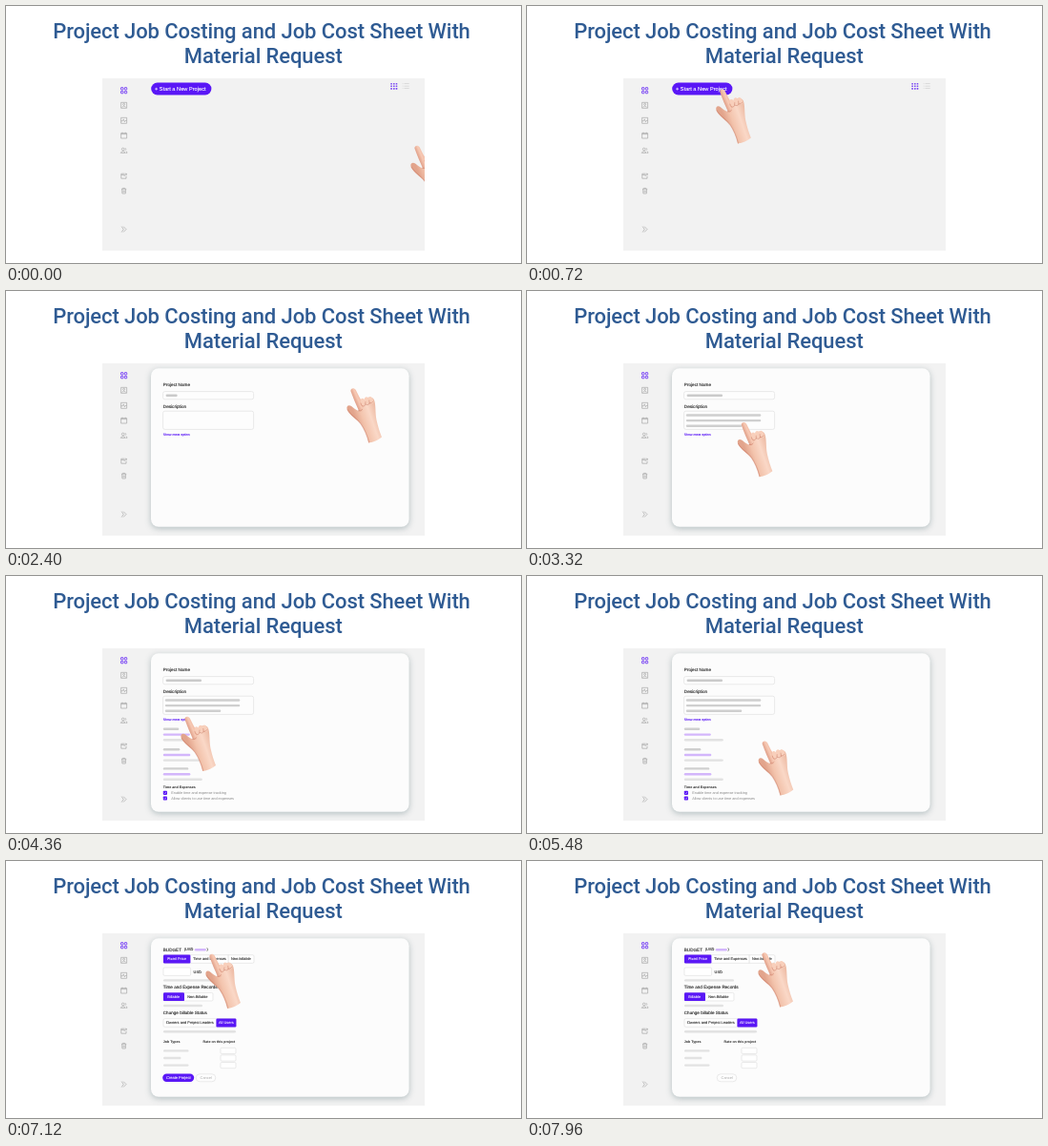
These frames come from a looping animation (540x270 px, 8000 ms). An HTML page with a canvas:

```html
<!DOCTYPE html>
<html lang="en">
<head>
<meta charset="utf-8">
<title>Project Job Costing</title>
<style>
  html, body { margin: 0; width: 100%; height: 100%; overflow: hidden; background: #fff; }
  canvas { display: block; width: 540px; height: 270px; }
</style>
</head>
<body>
<canvas id="stage"></canvas>
<script>
const W = 540, H = 270, LOOP = 8000;
const PURPLE = '#5a17f6', LILAC = '#d3b6fb', INK = '#222';
const GREY = '#cfcfcf', PALE = '#e2e2e2', EDGE = '#dcdcdc', STAGE = '#f2f2f2';
const SANS = '"Liberation Sans", Arial, sans-serif';
const canvas = document.getElementById('stage');
const ctx = canvas.getContext('2d');
const ratio = window.devicePixelRatio || 1;
canvas.width = W * ratio;
canvas.height = H * ratio;

const clamp = v => Math.max(0, Math.min(1, v));
const span = (t, from, to) => clamp((t - from) / (to - from));
const easeOut = (u, power) => 1 - (1 - u) ** power;
const easeInOut = u => (1 - Math.cos(Math.PI * u)) / 2;

// Fingertip moves: start, duration, x, y, ease power
const START = [431, 147];
const MOVES = [
  [240, 800, 202.5, 87, 5],
  [1080, 1040, 364, 102.5, 3],
  [3000, 800, 190, 148, 3],
  [4400, 600, 248, 168, 3],
  [5440, 240, 252, 186, 2],
  [5680, 560, 252, 158, 2],
  [6240, 580, 189, 99.5, 4],
  [7040, 440, 248, 96, 3],
  [7880, 100, 249, 96.5, 2]
];

function fingertip(t) {
  let [x, y] = START;
  for (const [start, length, toX, toY, power] of MOVES) {
    if (t < start) break;
    const p = easeOut(span(t, start, start + length), power);
    x += (toX - x) * p;
    y += (toY - y) * p;
  }
  return [x, y];
}

function box(x, y, w, h, r, fill, stroke, line = 0.6) {
  ctx.beginPath();
  ctx.roundRect(x, y, w, h, r);
  if (fill) { ctx.fillStyle = fill; ctx.fill(); }
  if (stroke) { ctx.strokeStyle = stroke; ctx.lineWidth = line; ctx.stroke(); }
}

function bar(x, y, w, color = GREY, h = 2.4) {
  if (w > 0) box(x, y - h / 2, w, h, Math.min(w, h) / 2, color);
}

// Set large and scaled down, so tiny type keeps its true spacing
function label(str, x, y, size, color = INK, weight = 400, edge = 0.12) {
  const zoom = 10;
  ctx.save();
  ctx.translate(x, y + size * 0.36);
  ctx.scale(1 / zoom, 1 / zoom);
  ctx.font = `${weight} ${size * zoom}px ${SANS}`;
  ctx.textRendering = 'geometricPrecision';
  ctx.textAlign = 'left';
  ctx.textBaseline = 'alphabetic';
  ctx.fillStyle = ctx.strokeStyle = color;
  ctx.fillText(str, 0, 0);
  if (edge) {
    ctx.lineWidth = edge * zoom;
    ctx.strokeText(str, 0, 0);
  }
  ctx.restore();
}

function clipTo(x, y, w, h, draw) {
  ctx.save();
  ctx.beginPath();
  ctx.rect(x, y, w, h);
  ctx.clip();
  draw();
  ctx.restore();
}

function title() {
  ctx.font = '500 22px Roboto, "Open Sans", sans-serif';
  ctx.letterSpacing = '-0.1px';
  ctx.textAlign = 'center';
  ctx.textBaseline = 'alphabetic';
  ctx.fillStyle = '#2f5b93';
  ctx.fillText('Project Job Costing and Job Cost Sheet With', 268, 33.6);
  ctx.fillText('Material Request', 269.7, 59.6);
  ctx.letterSpacing = '0px';
}

function icon(path, y) {
  ctx.save();
  ctx.translate(123.6, y);
  ctx.strokeStyle = '#a3a3a3';
  ctx.lineWidth = 0.65;
  ctx.stroke(new Path2D(path));
  ctx.restore();
}

const FRAME = 'M-3-3H3V3H-3Z';
const ICONS = [
  [104.3, FRAME + 'M-1-1A1 1 0 1 0 1-1A1 1 0 1 0-1-1M-2 2Q0-.6 2 2'],
  [120.3, FRAME + 'M-3 .5H-1.4L-.4-1.4L.8 1.4L1.6 0H3'],
  [136, 'M-3-2.4H3V3H-3ZM-3-1.4H3M-1.6-3.4V-2M1.6-3.4V-2'],
  [151.8, 'M-2.2-1.4A1.3 1.3 0 1 0 .4-1.4A1.3 1.3 0 1 0-2.2-1.4M-3.4 2.5Q-.9-1 1.6 2.5ZM1.2-2.7Q3.2-1.4 1.2-.2M2 .4Q3.2 1 3.4 2.5H2.2'],
  [178.6, 'M1-2.4H-2.8V2.6H2.4V0M-2.8-1.2H1M0 .4L2.8-2.4M1.4-2.4H2.8V-1'],
  [194.2, 'M-2.6-2H2.6M-1-2V-2.8H1V-2M-2-2L-1.7 2.8H1.7L2-2M-.6-.6V1.6M.6-.6V1.6'],
  [234.6, 'M-2.4-3L-.4 0L-2.4 3M-.6-3L2.4 0L-.6 3']
];

function backdrop() {
  ctx.fillStyle = STAGE;
  ctx.fillRect(101, 76, 338, 181);
  for (const dx of [-3.1, 0.7])
    for (const dy of [-3.1, 0.7])
      box(123.6 + dx, 88.7 + dy, 2.4, 2.4, 0.5, null, PURPLE, 0.75);
  for (const [y, path] of ICONS) icon(path, y);

  box(152.2, 80.6, 63.2, 12.8, 6.4, PURPLE);
  label('+ Start a New Project', 156, 87, 5.65, '#fff');
  for (let i = 0; i < 9; i++)
    box(403.3 + (i % 3) * 2.7, 80.9 + Math.floor(i / 3) * 2.6, 1.6, 1.6, 0.3, '#7a48f3');
  for (let i = 0; i < 3; i++) {
    bar(415.6, 81.6 + i * 2.5, 1, '#d2d2d2', 0.6);
    bar(417.4, 81.6 + i * 2.5, 5.4, '#d2d2d2', 0.6);
  }
}

function card() {
  ctx.fillStyle = STAGE;
  ctx.fillRect(150, 79, 275, 178);
  ctx.save();
  ctx.shadowColor = 'rgba(70,100,105,.36)';
  ctx.shadowBlur = 6 * ratio;
  ctx.shadowOffsetY = 1.8 * ratio;
  box(152, 81.2, 270.6, 166.6, 8, '#fcfcfc');
  ctx.restore();
}

function projectForm(t) {
  label('Project Name', 164.8, 98, 4.65);
  box(164.6, 105.6, 95, 8.2, 2, '#fdfdfd', EDGE);
  bar(167.6, 109.8, 12 + 25.5 * span(t, 2400, 2680), '#cacaca');
  label('Desicription', 164.8, 121, 4.65);
  box(164.6, 126.2, 95, 19.2, 2, '#fdfdfd', EDGE);
  [78.5, 78.5, 58.5].forEach((w, i) =>
    bar(166.8, 130.5 + i * 5.6, w * span(t, 2680 + i * 180, 2860 + i * 180), GREY));
  label('Show more option', 164.8, 151, 3.45, PURPLE);

  const shown = span(t, 3940, 4340);
  if (!shown) return;
  clipTo(160, 156, 120, 82 * shown, () => {
    const groups = [[160.8, 16.5, 28], [182.2, 17.5, 28.5], [202.4, 26.5, 28.5]];
    for (const [y, head, mid] of groups) {
      bar(164.8, y, head);
      bar(164.8, y + 5.8, mid, LILAC);
      bar(164.8, y + 11.4, 41, PALE);
    }
    label('Time and Expenses', 164.8, 221.5, 3.65, INK, 700, 0);
    const options = ['Enable time and expense tracking', 'Allow clients to use time and expenses'];
    options.forEach((str, i) => {
      const y = 227.8 + i * 5.7;
      box(164.8, y - 2.1, 4.2, 4.2, 0.8, PURPLE);
      ctx.strokeStyle = '#fff';
      ctx.lineWidth = 0.5;
      ctx.beginPath();
      ctx.moveTo(165.9, y);
      ctx.lineTo(166.7, y + 0.8);
      ctx.lineTo(168, y - 0.8);
      ctx.stroke();
      label(str, 173.2, y, 3.83, '#888', 400, 0);
    });
  });
}

// Segmented control: edges[i]..edges[i + 1] bounds segment i
function segments(y, edges, names, starts, active) {
  const left = edges[0], width = edges[edges.length - 1] - left;
  box(left, y - 4.3, width, 8.6, 1.4, '#fff', EDGE);
  names.forEach((name, i) => {
    const on = i === active;
    if (on) box(edges[i], y - 4.4, edges[i + 1] - edges[i], 8.8, 1.2, PURPLE);
    else if (i && i - 1 !== active) box(edges[i], y - 4.3, 0.1, 8.6, 0, null, EDGE, 0.4);
    label(name, starts[i], y, 3.93, on ? '#fff' : INK, 400, 0.08);
  });
}

function budgetForm(fixed, canCreate) {
  const at = (y, shift) => y + (fixed ? shift : 0);
  label('BUDGET', 164.8, 93, 4.6);
  label('(USD', 186.8, 93, 3.9);
  bar(197.8, 93.2, 12, LILAC);
  label(')', 210.4, 93, 3.9);
  segments(103, [165, 193.4, 233, 260], ['Fixed Price', 'Time and Expenses', 'Non-billable'],
    [169.2, 196.2, 236], fixed ? 0 : 1);
  if (fixed) {
    box(165, 112, 28.6, 8.4, 1.2, '#fff', EDGE);
    label('USD', 196.6, 116.2, 3.9);
    bar(165, 125.4, 52, PALE);
  }
  label('Time and Expense Records', 164.8, at(112.8, 19.8), 4.62);
  segments(at(123.4, 19.3), [165, 187, 217], ['Billable', 'Non-Billable'], [169.2, 190.2], 0);
  bar(165, at(132.4, 19.6), fixed ? 41 : 52, PALE);
  label('Change billable Status', 164.8, at(140.4, 19.2), 4.6);
  segments(at(151, 19), [165, 220.4, 241.4], ['Owners and Project Leaders', 'All Users'], [168, 223], 1);
  bar(165, at(160.2, 19), 76, PALE);
  label('Job Types', 164.8, at(172, 17.5), 3.65, INK, 700, 0);
  label('Rate on this project', 206.6, at(172, 17.5), 3.6, INK, 700, 0);
  [26.5, 18.5, 26.5].forEach((w, i) => {
    const y = at(182 + i * 7.6, 17.4);
    bar(165, y, w, PALE);
    box(225, y - 3.1, 16, 6.2, 1.2, '#fff', EDGE);
  });
  if (!fixed) bar(165, 205, 64, '#e6e6e6', 0.7);
  const y = at(213.2, 14.6);
  if (canCreate) {
    box(164.2, y - 4.2, 33, 8.4, 4.2, PURPLE);
    label('Create Project', 168, y, 4, '#fff', 400, 0.08);
  }
  box(199.2, y - 4, 20.6, 8, 4, '#fdfdfd', EDGE);
  label('Cancel', 203.6, y, 3.9, '#aaa', 400, 0);
}

const ARM = new Path2D('M8 18C9 10 19 6 22 12C24 17 23 25 24.5 33C26 40 28 46 30 51Q24 56 16.3 57C14.5 49 12 43 8 37C4 32-3 29-6.3 22C-7.6 18-4.5 16.4-1.5 18.8C1 21 3 22.5 5.5 23.5Z');
const FINGER = new Path2D('M-2.6 2.6C-2.6-.6 1-1.2 2.8 1.6C5 6 7 10.5 10.5 15.5L10 24L6 23.5C3.6 18 0 10-2.6 2.6Z');
const SHADE = new Path2D('M-5.8 22.2C-2.8 28 4 31.4 8.2 37.2C12.2 43 14.6 49 16.6 56.4');
const CREASES = new Path2D('M8 15.5Q8.6 19.4 11.6 18.4Q13.4 17.6 13 14M13 16.6Q15.6 18 17.2 15.8L16.8 12.4M17.2 15.4Q19.6 16 20.8 13.6M5.5 23.4Q8 24.4 9.8 21.8');

function hand([x, y]) {
  ctx.save();
  ctx.translate(x, y);
  const skin = ctx.createLinearGradient(4, 36, 27, 28);
  skin.addColorStop(0, '#e2a48c');
  skin.addColorStop(0.3, '#f3c4ad');
  skin.addColorStop(0.65, '#fad8c7');
  skin.addColorStop(1, '#ecb9a2');
  ctx.fillStyle = skin;
  ctx.fill(ARM);

  const tone = ctx.createLinearGradient(0, 10, 7, 7);
  tone.addColorStop(0, '#df9d86');
  tone.addColorStop(0.55, '#f7cab5');
  tone.addColorStop(1, '#efb69f');
  ctx.fillStyle = tone;
  ctx.fill(FINGER);

  ctx.lineCap = 'round';
  ctx.fillStyle = '#f8cfbb';
  for (const [cx, cy] of [[18.6, 12.2], [14.6, 12.4], [10.4, 14]]) {
    ctx.beginPath();
    ctx.ellipse(cx, cy, 2.4, 3.8, -0.4, 0, Math.PI * 2);
    ctx.fill();
  }
  ctx.strokeStyle = 'rgba(192,110,88,.6)';
  ctx.lineWidth = 0.7;
  ctx.stroke(CREASES);
  ctx.strokeStyle = 'rgba(205,125,102,.5)';
  ctx.lineWidth = 1.1;
  ctx.stroke(SHADE);
  ctx.restore();
}

function draw(t) {
  ctx.setTransform(ratio, 0, 0, ratio, 0, 0);
  ctx.fillStyle = '#fff';
  ctx.fillRect(0, 0, W, H);
  title();
  backdrop();

  const wipe = span(t, 1100, 2120);
  if (wipe) clipTo(101, 76, 338, 4 + 177 * wipe, () => {
    card();
    const page = 156, scroll = page * easeInOut(span(t, 5480, 6240));
    clipTo(152, 76, 271, 167, () => {
      ctx.translate(0, -scroll);
      if (scroll < page) projectForm(t);
      ctx.translate(0, page);
      if (scroll > 0) budgetForm(t >= 6640, t < 7920);
    });
  });
  clipTo(101, 76, 338, 181, () => hand(fingertip(t)));
}

const began = performance.now();
function tick() {
  draw((performance.now() - began) % LOOP);
  requestAnimationFrame(tick);
}
tick();
</script>
</body>
</html>
```
